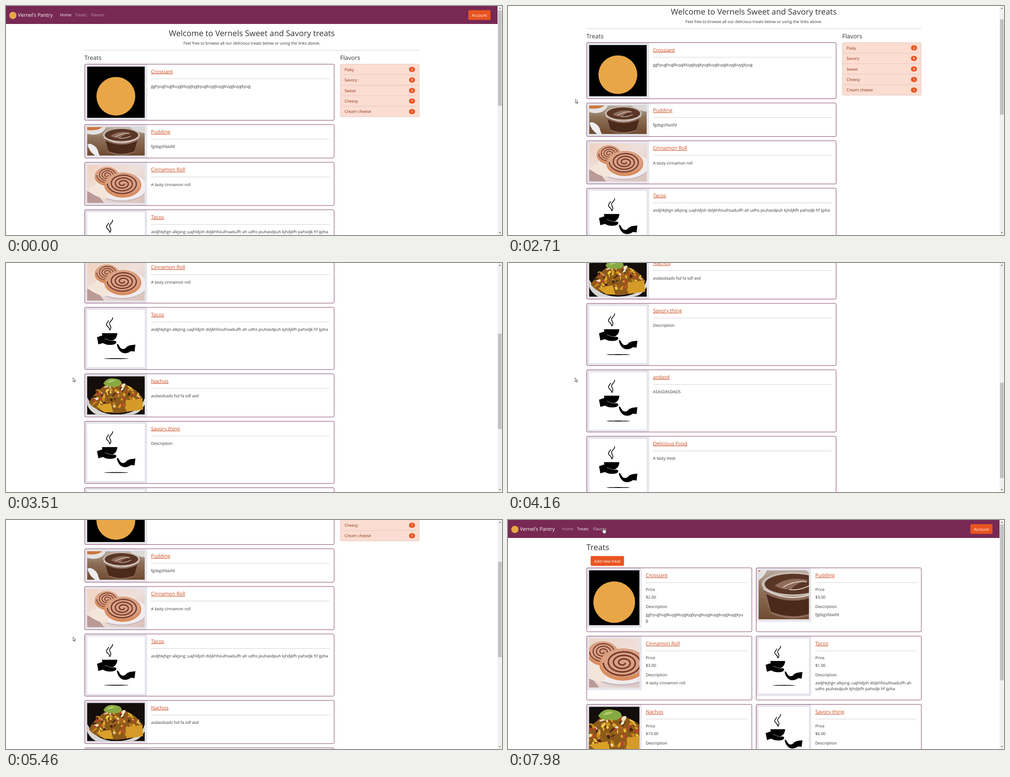
An HTML page that plays this animation: 1098x510 px, repeating every 8 s.

```html
<!DOCTYPE html>
<html lang="en">
<head>
<meta charset="utf-8">
<title>Sweet and savory treats</title>
<style>
  @property --scroll { syntax: "<number>"; inherits: true; initial-value: 0; }
  html, body { margin: 0; width: 100%; height: 100%; overflow: hidden; background: #fff; }
  #stage {
    display: block; width: 1098px; height: 510px;
    font-family: "Open Sans", "Noto Sans", sans-serif;
    text-rendering: geometricPrecision;
  }
  #home, #treats, #cursor, .arrow, .hand, .hover-treats, .hover-flavors {
    animation: 8s step-end infinite;
  }
  #home { animation-name: scroll, leave; }
  #treats { animation-name: enter; }
  .page { transform: translateY(calc(var(--scroll) * -1px)); }
  .thumb { transform: translateY(calc(var(--scroll) * .416px)); }
  #cursor { animation-name: point; }
  .arrow { animation-name: arrow; }
  .hand { animation-name: hand; }
  .hover-treats { animation-name: hover-treats; }
  .hover-flavors { animation-name: hover-flavors; }
  .link { text-decoration: underline; text-decoration-thickness: .8px; }

  @keyframes leave { 0% { visibility: visible } 87.375%, 100% { visibility: hidden } }
  @keyframes enter { 0% { visibility: hidden } 87.375%, 100% { visibility: visible } }
  @keyframes arrow { 0% { visibility: visible } 83.375%, 100% { visibility: hidden } }
  @keyframes hand { 0% { visibility: hidden } 83.375%, 100% { visibility: visible } }
  @keyframes hover-treats { 0% { fill-opacity: .55 } 83.375%, 100% { fill-opacity: .75 } }
  @keyframes hover-flavors { 0% { fill-opacity: .55 } 96.625%, 100% { fill-opacity: .75 } }
  @keyframes scroll {
    0% { --scroll: 0 }
    32.875% { --scroll: 8 } 33.875% { --scroll: 48 } 34.875% { --scroll: 98 }
    35.875% { --scroll: 142 } 36.875% { --scroll: 183 } 37.875% { --scroll: 219 }
    38.875% { --scroll: 255 } 39.875% { --scroll: 286 }
    41.875% { --scroll: 305 } 42.875% { --scroll: 355 } 44% { --scroll: 405 }
    45% { --scroll: 440 } 46% { --scroll: 457 }
    50% { --scroll: 480 } 51% { --scroll: 560 } 52% { --scroll: 617.6 }
    53% { --scroll: 652 } 54% { --scroll: 663 }
    60.125% { --scroll: 640 } 61.125% { --scroll: 530 } 62.125% { --scroll: 434 }
    64.125% { --scroll: 363 } 65.125% { --scroll: 275 } 66.125% { --scroll: 229 }
    68.25% { --scroll: 200 } 69.25% { --scroll: 100 } 70.25% { --scroll: 25 }
    71%, 100% { --scroll: 0 }
  }
  @keyframes point {
    0% { transform: translate(-30px, 0) }
    13.5% { transform: translate(1085.5px, 318px) }
    19.625% { transform: translate(860px, 215px) }
    20.625% { transform: translate(480px, 142px) }
    21.625% { transform: translate(195.5px, 248px) }
    24.625% { transform: translate(138.7px, 231px) }
    30.875% { transform: translate(187px, 81px) }
    32.875% { transform: translate(160px, 160px) }
    33.875% { transform: translate(149px, 207px) }
    42.875% { transform: translate(148px, 255px) }
    53% { transform: translate(147.6px, 258px) }
    56% { transform: translate(148px, 260px) }
    76.125% { transform: translate(144.4px, 191px) }
    81.25% { transform: translate(158px, 110px) }
    82.25% { transform: translate(170px, 42px) }
    83.375% { transform: translate(169.5px, 17px) }
    94.625% { transform: translate(176px, 22px) }
    95.625% { transform: translate(188px, 25px) }
    96.625% { transform: translate(200px, 23px) }
    97.625% { transform: translate(206.5px, 19px) }
    99.75%, 100% { transform: translate(207.8px, 16.7px) }
  }
</style>
</head>
<body>
<svg id="stage" viewBox="0 0 1098 510">
  <defs>
    <linearGradient id="wood" x2="0" y2="1">
      <stop stop-color="#b9aaa0"/><stop offset=".4" stop-color="#8d7159"/><stop offset="1" stop-color="#6f4a30"/>
    </linearGradient>
    <linearGradient id="linen" x2="1" y2="1">
      <stop stop-color="#f0d3c0"/><stop offset=".5" stop-color="#eee0dc"/><stop offset="1" stop-color="#d9c0b8"/>
    </linearGradient>
    <symbol id="croissant" viewBox="0 0 127.5 114" preserveAspectRatio="xMidYMid slice">
      <rect width="128" height="114"/>
      <circle cx="63.7" cy="66" r="43" fill="#e8a647"/>
    </symbol>
    <symbol id="pudding" viewBox="0 0 127.5 64" preserveAspectRatio="xMidYMid slice">
      <rect width="128" height="64" fill="url(#wood)"/>
      <path d="M0 0H42Q36 15 18 17Q6 18 0 14Z" fill="#e4e2e1"/>
      <path d="M0 0H34Q26 9 0 7Z" fill="#c9773f"/>
      <path d="M92 0H128V14Q108 12 92 0Z" fill="#dcd9d6"/>
      <path d="M36 18Q76 46 116 18L106 56Q76 70 46 56Z" fill="#8b6a58"/>
      <path d="M41 31Q76 48 111 31L105 54Q76 66 47 54Z" fill="#4c2a1b"/>
      <ellipse cx="76" cy="18" rx="41" ry="16" fill="#c6bab1"/>
      <ellipse cx="76" cy="18" rx="37" ry="13.5" fill="#5a3626"/>
      <path d="M52 20Q70 7 96 13Q81 16 74 24Q64 27 52 20Z" fill="#8f6c5a"/>
      <path d="M63 22Q77 13 94 15M71 25Q84 27 97 20" fill="none" stroke="#dccfc7" stroke-width="1.2"/>
      <path d="M37 24Q76 47 115 24" fill="none" stroke="#ded6d0" stroke-width="1.6"/>
      <path d="M1 40Q4 35 13 40Q24 47 25 57L28 64H18Q5 55 1 40Z" fill="#eeeef1"/>
    </symbol>
    <symbol id="cinnamon" viewBox="0 0 127.5 85" preserveAspectRatio="xMidYMid slice">
      <rect width="128" height="85" fill="url(#linen)"/>
      <path d="M0 58L26 70L38 85H0Z" fill="#b99a96"/>
      <ellipse cx="76" cy="52" rx="57" ry="30" fill="#c9bcc4"/>
      <ellipse cx="76" cy="49" rx="57" ry="30" fill="#f1ecee"/>
      <path d="M0 56Q20 37 38 48Q54 65 44 75Q22 75 0 56Z" fill="#f4e5da"/>
      <g id="rolls"></g>
    </symbol>
    <symbol id="nachos" viewBox="0 0 127.5 85" preserveAspectRatio="xMidYMid slice">
      <rect width="128" height="85" fill="#130d0b"/>
      <path d="M0 46Q18 85 64 85Q118 84 128 46V62Q116 85 96 85H20Q4 76 0 62Z" fill="#d8d6d3"/>
      <path d="M4 58Q14 40 32 26Q54 4 78 16Q107 24 124 50Q112 80 66 82Q18 80 4 58Z" fill="#8c5a1a"/>
      <g id="toppings"></g>
      <path d="M85 54L122 49L124 74L87 79Z" fill="#d59a27"/>
      <path d="M20 66L52 60L58 80L38 80Z" fill="#d9a126"/>
      <path d="M36 16Q44 2 60 5Q78 7 76 17Q69 26 56 22Q44 25 36 16Z" fill="#86aa43"/>
      <path d="M44 14Q52 6 62 9Q56 14 44 14Z" fill="#b2cb70"/>
    </symbol>
    <symbol id="cup" viewBox="0 0 127.5 127.5" preserveAspectRatio="xMidYMid slice">
      <rect width="128" height="128" fill="#fff"/>
      <path d="M56.5 17.5C57 25 48 25 50 32C51.5 36 55 39 50.5 45M47.5 24C46 29 41 30 43.5 35C45.5 38 50 39 49.5 44" fill="none" stroke="#000" stroke-width="1.6" stroke-linecap="round"/>
      <path d="M33 52H67C66.5 60 63 65.5 57 68H43C37 65 33.5 60 33 52Z"/>
      <path d="M22 61L34 57C40 63 50 67 62 69C67 71 65 76 58 77.5C50 79 41 78 35 74L25 77Z"/>
      <path d="M39 64Q49 69 59 69.5" fill="none" stroke="#fff" stroke-width=".6"/>
      <path d="M66 76C70 76 71 82 75 86C80 89 85 87 88 82L95 79L107 77.5L105 93L97 92C91 97 82 98 77 95C71 92 66 83 66 76Z"/>
      <ellipse cx="64.5" cy="108.6" rx="27" ry=".9"/>
    </symbol>
  </defs>
  <g id="home"></g>
  <g id="treats"></g>
  <path d="M1091 6.2l2.2-2.4 2.2 2.4zM1091 503.8l2.2 2.4 2.2-2.4z" fill="#505050"/>
  <g id="cursor" fill="#fff" stroke="#222" stroke-width=".8" stroke-linejoin="round">
    <path class="arrow" d="M.4.4V9.3L2.4 7.5 3.8 10.6 5 10 3.7 7H6.4Z"/>
    <path class="hand" d="M2.6 8V1.6a1 1 0 0 1 2 0V5l4 .9q1 .3 1 1.5L8.8 11v2.4H3.7L.6 8.9Q.2 7.5 1.6 7.4Z"/>
  </g>
</svg>
<script>
const BODY = 8.91, TITLE = 11.14, HEADING = 13.4, DISPLAY = 17.8;
const PLUM = '#772953', ORANGE = '#e95420', INK = '#333';
const $ = id => document.getElementById(id);

const rect = (x, y, w, h, fill, extra = '') =>
  `<rect x="${x}" y="${y}" width="${w}" height="${h}" fill="${fill}" ${extra}/>`;
const text = (x, y, size, str, fill = INK, extra = '') =>
  `<text x="${x}" y="${y}" font-size="${size}" fill="${fill}" ${extra}>${str}</text>`;
const rule = (x1, x2, y) => rect(x1, y - .4, x2 - x1, .9, '#cdcdcd');
const centred = 'text-anchor="middle"';
const picture = (id, x, y, w, h) =>
  `<use href="#${id}" x="${x}" y="${y}" width="${w}" height="${h}"/>`;
const button = (x, y, w, label) =>
  rect(x, y, w, 21.8, ORANGE, 'rx="2.3"') +
  text(x + w / 2, y + 14.3, BODY, label, '#fff', centred + ' font-weight="500"');
const frame = (x, y, w, h) =>
  rect(x, y, w, h, 'none', `rx="2.3" stroke="${PLUM}" stroke-width=".9"`);
const scrollbar = (height, cls) =>
  rect(1088.3, 0, 9.7, 510, '#f1f1f1') + rect(1089.2, 9.7, 7.9, height, '#c1c1c1', `class="${cls}"`);

function nav(active) {
  const links = [['Home', 119.5], ['Treats', 153], ['Flavors', 188.5]].map(([label, x]) => {
    const style = label === active
      ? 'font-weight="500"'
      : `fill-opacity=".55" class="hover-${label.toLowerCase()}"`;
    return text(x, 23.4, BODY, label, '#fff', style);
  });
  return rect(0, 0, 1088.3, 40, PLUM) +
    '<circle cx="15.2" cy="21" r="8" fill="#e8a647"/>' +
    text(26.5, 24.2, TITLE, "Vernel's Pantry", '#fff') +
    links.join('') + button(1023.5, 9.2, 49, 'Account');
}

const treats = [
  ['Crossiant', 'croissant', 114, ['gghyughuglkuygkluygkygkyugkuygkuygkuygkuygkyu', 'g'], '2.00', ''],
  ['Pudding', 'pudding', 63.6, ['fgdsgsfdasfd'], '3.00'],
  ['Cinnamon Roll', 'cinnamon', 85.2, ['A tasty cinnamon roll'], '3.00'],
  ['Tacos', 'cup', 127.5, ['asdjhkjhgn alkjsng ;uajhldjsh dsljkhfoiulhsaduifh ah', 'udhs piuhasdpuh kjhdjkfh pahsdjk hf ijpha'], '1.00'],
  ['Nachos', 'nachos', 85.2, ['asdasdsads fsd fa sdf asd'], '19.00'],
  ['Savory thing', 'cup', 127.5, ['Description'], '6.00'],
  ['asdasd', 'cup', 127.5, ['ASASDASDADS']],
  ['Delicious Food', 'cup', 127.5, ['A tasty treat']],
].map(([name, image, height, lines, price, joiner = ' ']) => ({ name, image, height, lines, price, joiner }));

const titleLink = (x, y, name) => text(x, y, TITLE, name, '#cb4a1e', 'class="link"');

function wideCards() {
  let y = 129.5;
  return treats.map(({ name, image, height, lines, joiner }) => {
    const top = y, h = height + 11;
    y += h + 9.5;
    return rect(174.8, top + .4, 137.6, h - .8, '#e6e5eb') +
      picture(image, 179.5, top + 5.5, 127.5, height) +
      frame(174.2, top, 552.2, h) + titleLink(321, top + 20, name) +
      rule(321, 717, top + 32.5) + text(321, top + 52.4, BODY, lines.join(joiner));
  }).join('');
}

function gridCards() {
  return treats.slice(0, 6).map(({ name, image, lines, price }, i) => {
    const x = 174.2 + i % 2 * 375.2, y = 106.6 + (i >> 1) * 152;
    const h = image === 'croissant' || image === 'cup' ? 122.3 : 109;
    const column = [[51, 'Price'], [68.2, '$' + price], [89.5, 'Description'],
      ...lines.map((line, n) => [107 + n * 13.8, line])];
    return rect(x + .5, y + .4, 121.2, h + 10.6, '#e6e5eb') +
      picture(image, x + 5.3, y + 5.5, 111.4, h) +
      frame(x, y, 365.6, 142.3) + titleLink(x + 130.8, y + 20.4, name) +
      rule(x + 130.8, x + 355.2, y + 32.7) +
      column.map(([dy, str]) => text(x + 130.8, y + dy, BODY, str)).join('');
  }).join('');
}

function flavorList() {
  const items = [['Flaky', 2], ['Savory', 0], ['Sweet', 3], ['Cheesy', 1], ['Cream cheese', 1]];
  const rowHeight = 23.45;
  return rect(740.2, 129.5, 174.6, 5 * rowHeight, '#fbddd2', 'rx="2.3" stroke="#dfc0b5" stroke-width=".8"') +
    items.map(([label, count], i) => {
      const y = 129.5 + i * rowHeight;
      return (i ? rect(740.2, y - .4, 174.6, .8, '#e4bfb2') : '') +
        text(749.4, y + 15.1, BODY, label, '#8c3213') +
        rect(892, y + 6.1, 13.4, 11.4, ORANGE, 'rx="5.7"') +
        text(898.7, y + 14.2, 6.7, count, '#fff', centred + ' font-weight="700"');
    }).join('');
}

function roll(cx, cy, rx, ry) {
  const points = Array.from({ length: 90 }, (_, i) => {
    const a = i / 89 * Math.PI * 7, r = .08 + .76 * i / 89;
    return `${(cx + rx * r * Math.cos(a)).toFixed(1)} ${(cy - 3 + ry * r * Math.sin(a)).toFixed(1)}`;
  });
  return `<ellipse cx="${cx}" cy="${cy}" rx="${rx}" ry="${ry}" fill="#d98d5f"/>` +
    `<ellipse cx="${cx}" cy="${cy - 3}" rx="${rx * .93}" ry="${ry * .87}" fill="#d9a184"/>` +
    `<path d="M${points.join('L')}" fill="none" stroke="#74392b" stroke-width="${rx * .065}"/>`;
}

function toppings() {
  let seed = 11;
  const random = () => (seed = seed * 16807 % 2147483647) / 2147483647;
  const colors = ['#d9a024', '#eec546', '#f0e3c4', '#a8661b', '#4a2714', '#b8452a', '#c98a1e'];
  return Array.from({ length: 120 }, (_, i) => {
    const a = random() * Math.PI * 2, r = Math.sqrt(random());
    const x = 64 + 55 * r * Math.cos(a), y = 51 + 27 * r * Math.sin(a) - 9 * (1 - Math.abs(x - 64) / 55);
    return `<ellipse cx="${x}" cy="${y}" rx="${2 + random() * 4}" ry="${1 + random() * 2}" ` +
      `fill="${colors[i % colors.length]}" transform="rotate(${random() * 180} ${x} ${y})"/>`;
  }).join('');
}

$('rolls').innerHTML = roll(44, 26, 27, 21) + roll(79, 45, 41, 28);
$('toppings').innerHTML = toppings();
$('home').innerHTML = `<g class="page">${nav('Home')}` +
  text(544.2, 66.6, DISPLAY, 'Welcome to Vernels Sweet and Savory treats', INK, centred) +
  text(544.2, 85.7, BODY, 'Feel free to browse all our delicious treats below or using the links above.', INK, centred) +
  rule(174, 915, 98.5) +
  text(173.6, 120.4, HEADING, 'Treats') + text(739.8, 120.4, HEADING, 'Flavors') +
  wideCards() + flavorList() + '</g>' + scrollbar(212.5, 'thumb');
$('treats').innerHTML = nav('Treats') + text(173.6, 66.6, DISPLAY, 'Treats') +
  button(183, 80.2, 73.8, 'Add new treat') + gridCards() + scrollbar(347.5, '');
</script>
</body>
</html>
```
